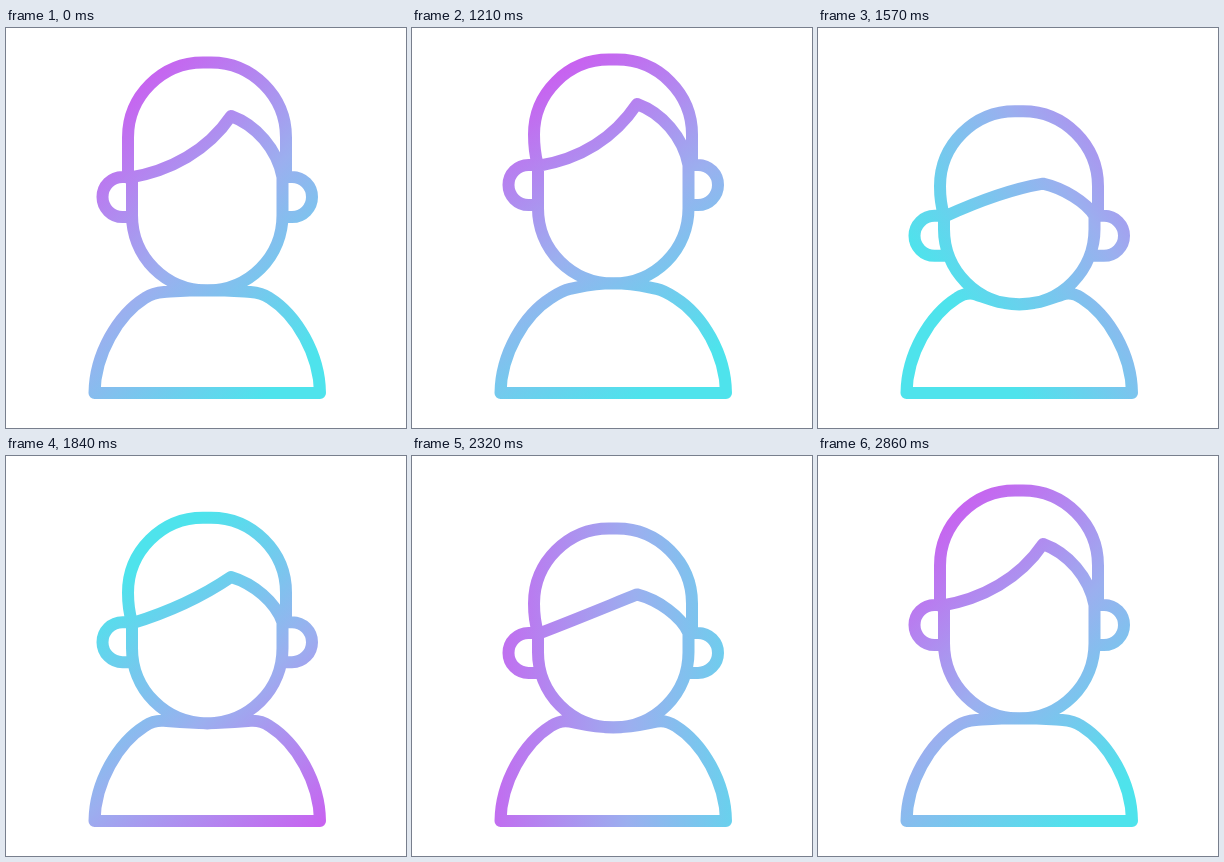
Write an HTML page with a canvas that moves like this. It is 400x400 px and loops after 2.89 s.

```html
<!DOCTYPE html>
<html lang="en">
<head>
<meta charset="utf-8">
<title>Nodding avatar</title>
<style>
html, body { margin: 0; width: 100%; height: 100%; overflow: hidden; background: #fff; }
canvas { display: block; width: 400px; height: 400px; }
</style>
</head>
<body>
<canvas width="400" height="400"></canvas>
<script>
const ctx = document.querySelector('canvas').getContext('2d');
const LOOP = 2890, STEP = 30, START = 1000, END = 2860, MID = 201.25;
const MIRROR = new DOMMatrix([-1, 0, 0, 1, 2 * MID, 0]);

// Turning points of the head: time and drop in pixels
const NOD = [[START, 0], [1210, -12], [1550, 39], [1860, 17], [2230, 31], [2710, -6], [END, 0]];

const progress = (from, to, t) => Math.min(1, Math.max(0, (t - from) / (to - from)));
const ease = (from, to, t) => (1 - Math.cos(Math.PI * progress(from, to, t))) / 2;

function headDrop(t) {
  let drop = 0;
  for (let i = 1; i < NOD.length; i++) {
    const [from, a] = NOD[i - 1], [to, b] = NOD[i];
    drop += (b - a) * ease(from, to, t);
  }
  return drop;
}

// One clockwise turn of the colours, drifting off centre on the way
function gradient(t) {
  const u = 1 - (1 - progress(1060, END, t)) ** 1.25;
  const turn = 2 * Math.PI * u * u * (3 - 2 * u);
  const shift = 0.12 * Math.sin(turn) + 0.075 * (1 - Math.cos(turn));
  const angle = turn + 0.82, size = 322;
  const x = Math.cos(angle) * size, y = Math.sin(angle) * size;
  const from = 0.5 + shift, to = 0.5 - shift;
  const g = ctx.createLinearGradient(200 - x * from, 205 - y * from, 200 + x * to, 205 + y * to);
  ['#c960f0', '#9bafef', '#4ee3ec'].forEach((color, i) => g.addColorStop(i / 2, color));
  return g;
}

function halfFigure(earTop, chinY, neckY) {
  const p = new Path2D();
  // Ear
  p.moveTo(126, earTop);
  p.lineTo(116.5, earTop);
  p.arc(116.5, earTop + 20, 20, -Math.PI / 2, Math.PI / 2, true);
  p.lineTo(126, earTop + 40);
  // Face
  p.moveTo(126, earTop);
  p.lineTo(126, chinY - 75);
  p.arc(MID, chinY - 75, MID - 126, Math.PI, Math.PI / 2, true);
  // Shoulder and neckline
  const dip = chinY - neckY;
  p.moveTo(MID, 365);
  p.lineTo(88.5, 365);
  p.bezierCurveTo(89, 326, 112, 287, 139, 270);
  p.bezierCurveTo(145, 266, 151, neckY - 0.25 * dip, 158, neckY);
  p.bezierCurveTo(172, neckY + 0.5 * dip, 182, chinY, MID, chinY);
  return p;
}

function addHair(p, top, earTop, tipY, squeeze, flat) {
  const left = 122 + 0.4 * squeeze, right = 280, r = 75, k = 0.45 * r;
  p.moveTo(left, earTop);
  p.quadraticCurveTo(122, top + r + 16, 122, top + r);
  p.bezierCurveTo(122, top + k, 122 + k, top, 122 + r, top);
  p.lineTo(right - r, top);
  p.bezierCurveTo(right - k, top, right, top + k, right, top + r);
  p.lineTo(right, earTop);
  // Fringe
  p.moveTo(left, earTop + 1);
  p.bezierCurveTo(left + 43 - 0.3 * flat, earTop - 6 - 0.3 * flat,
    202 - 0.25 * flat, tipY + 34 - flat, 225, tipY);
  p.bezierCurveTo(250 - 0.15 * flat, tipY + 9 - 0.15 * flat,
    271 - 0.1 * flat, earTop - 28 + 0.5 * flat, 276.5, earTop);
}

function draw(time) {
  const t = Math.floor((time - 10) / STEP) * STEP + 10;
  const drop = headDrop(t), bow = Math.max(0, drop) / 39;
  const squeeze = 10 * (ease(START, 1260, t) - ease(2450, 2700, t));
  const flat = 29 * bow ** 0.75;
  const chin = drop < 0 ? 0.58 * drop : 14 * bow ** 1.3;
  const neckY = 264 + chin * (chin < 0 ? 0.45 : 0.18);

  const half = halfFigure(149 + drop, 262.3 + chin, neckY);
  const figure = new Path2D(half);
  figure.addPath(half, MIRROR);
  addHair(figure, 34.5 + drop + squeeze, 149 + drop, 88 + drop + flat, squeeze, flat);

  ctx.clearRect(0, 0, 400, 400);
  ctx.lineWidth = 12;
  ctx.lineCap = ctx.lineJoin = 'round';
  ctx.strokeStyle = gradient(t);
  ctx.stroke(figure);
}

const start = performance.now();
function frame() {
  draw((performance.now() - start) % LOOP);
  requestAnimationFrame(frame);
}
frame();
</script>
</body>
</html>
```
